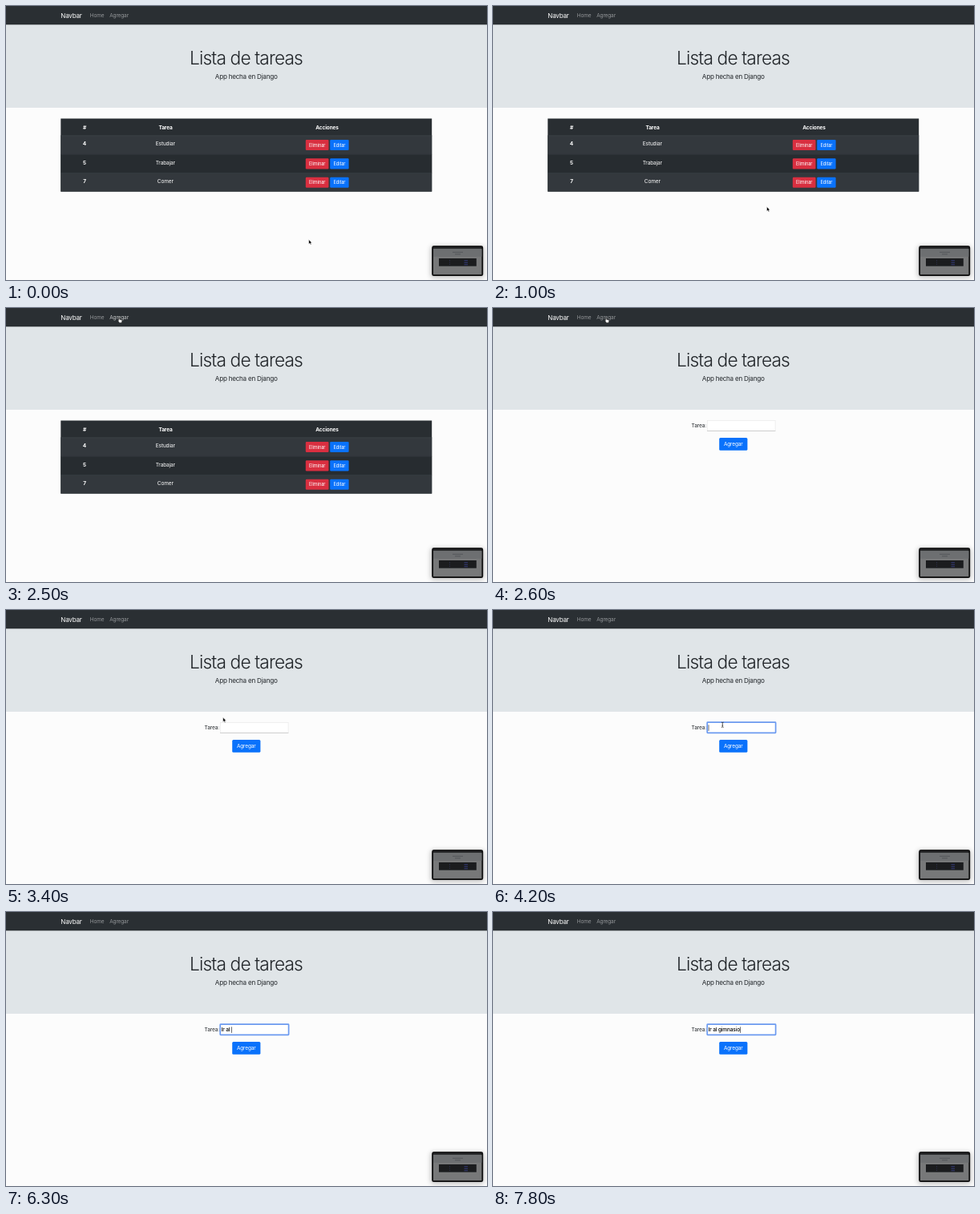
Recreate the animation shown at these times as an HTML page. Size 600 by 342 pixels, loop 8000 ms.

```html
<!DOCTYPE html>
<html lang="es">
<head>
<meta charset="utf-8">
<title>Lista de tareas</title>
<style>
  html, body { margin: 0; width: 100%; height: 100%; overflow: hidden; background: #fcfcfc; }
  svg { display: block; width: 100vw; height: 100vh; }
  text { font: 6.5px Inter, "Noto Sans", sans-serif; font-optical-sizing: none; letter-spacing: -.02em; white-space: pre; fill: #212529; }
  .mid { text-anchor: middle; }
  .head { font-weight: 700; }
  .light { fill: #fff; }
  .brand { font-size: 8.1px; letter-spacing: -.03em; }
  .title { font-size: 22.75px; font-weight: 300; letter-spacing: -.038em; }
  .lead { font-size: 8.12px; letter-spacing: -.03em; }
  .small { font-size: 5.7px; }
  .link { fill: #94979a; }
  .link.hover { fill: #c9cbcc; }
  #typed { font-weight: 500; fill: #000; }
</style>
</head>
<body>
<svg viewBox="0 0 600 342">
  <defs>
    <filter id="blur" x="-30%" y="-30%" width="160%" height="160%"><feGaussianBlur stdDeviation="3"/></filter>
  </defs>
  <rect width="600" height="342" fill="#fcfcfc"/>
  <rect y="23" width="600" height="104" fill="#e0e5e8"/>
  <rect width="600" height="23.3" fill="#2a2f33"/>
  <text class="light brand" x="68.3" y="14.6">Navbar</text>
  <text class="link" x="104.8" y="14.3">Home</text>
  <text class="link" id="add" x="129.2" y="14.3">Agregar</text>
  <text class="title mid" x="299.5" y="72.9">Lista de tareas</text>
  <text class="lead mid" x="299.7" y="90.5">App hecha en Django</text>

  <g id="list">
    <rect x="68.3" y="140.5" width="462.9" height="91" fill="#292e32"/>
    <text class="light head mid" x="98" y="153.7">#</text>
    <text class="light head mid" x="199" y="153.7">Tarea</text>
    <text class="light head mid" x="400.5" y="153.7">Acciones</text>
  </g>

  <g id="form">
    <text x="247.6" y="149.3" fill="#212529">Tarea:</text>
    <rect x="267.3" y="140.3" width="84.8" height="13.2" fill="#fff" stroke="#e6e6e6" stroke-width=".6"/>
    <path d="M267 153.4H352.4" stroke="#b8b8b8" stroke-width=".6"/>
    <rect id="ring" x="267.2" y="140.2" width="85.4" height="13.2" rx=".6" fill="#fff" stroke="#6c9af0" stroke-width="1.7"/>
    <text id="typed" x="268.6" y="149.3"></text>
    <rect id="caret" y="143.3" width=".6" height="7.6" fill="#111"/>
    <rect x="282.2" y="162" width="35.2" height="15.8" rx="1.6" fill="#0a72fb"/>
    <text class="light mid" x="299.8" y="172.3">Agregar</text>
  </g>

  <g id="thumb">
    <rect x="530" y="300" width="66" height="39" rx="3" opacity=".25" filter="url(#blur)"/>
    <rect x="531.2" y="299.3" width="64" height="37.8" rx="2.4" fill="#0c0c0d"/>
    <rect x="533" y="301" width="60.4" height="2.2" fill="#27282a"/>
    <rect x="533" y="303.2" width="60.4" height="32" fill="#777879"/>
    <rect x="533" y="303.2" width="60.4" height="9.6" fill="#6d6f71"/>
    <path d="M557 307.3H570M560 309.8H567" stroke="#4a4c4f" stroke-width=".7"/>
    <rect x="540" y="315" width="46.8" height="9.7" fill="#1b1c1e"/>
    <path d="M553.5 317V323.5" stroke="#33355a" stroke-width=".8" stroke-dasharray="1 1.4"/>
    <path d="M571.5 317.8H576M571.5 320.3H576M571.5 322.8H576" stroke="#343a78" stroke-width="1"/>
  </g>

  <path id="arrow" d="M0 0V5.6L1.3 4.5L2.2 6.5L3.2 6.1L2.3 4.1H4Z" stroke="#fff" stroke-width=".5"/>
  <path id="hand" d="M0 .4Q.6-.5 1.2 .4V2.2L4 2.9Q4.6 3.2 4.3 4.8L3.7 6.4H1L-.9 3.6Q-.8 2.9 0 3.5Z" fill="#fff" stroke="#111" stroke-width=".5"/>
  <path id="beam" d="M-1.4-3Q0-3 0-2.2Q0-3 1.4-3M0-2.2V2.4M-1.4 3.2Q0 3.2 0 2.4Q0 3.2 1.4 3.2M-.8.9H.8" fill="none" stroke="#222" stroke-width=".7"/>
</svg>
<script>
const LOOP = 8000, STEP = 100;
const PHRASE = 'Ir al gimnasio';
const KEY_TIMES = [5500, 5800, 5900, 6000, 6100, 6300, 6800, 6900, 7000, 7300, 7400, 7600, 7700, 7800];
const NAVIGATE = 2600, FOCUS = 4200;
// Pointer path: time, x, y
const PATH = [
  [0, 377.7, 291.6], [400, 377.7, 291.6], [1000, 341.5, 250.6], [1300, 342, 168],
  [2200, 144, 17], [2300, 140.4, 12], [2800, 140.4, 12],
  [3100, 255, 125], [3200, 255, 125], [3600, 286.3, 143.2], [LOOP, 286.3, 143.2]
];
const $ = id => document.getElementById(id);
const show = (id, on) => $(id).style.display = on ? '' : 'none';

function add(parent, tag, attrs, text = '') {
  const el = document.createElementNS('http://www.w3.org/2000/svg', tag);
  for (const k in attrs) el.setAttribute(k, attrs[k]);
  el.textContent = text;
  parent.append(el);
}

function button(x, y, width, fill, label) {
  add($('list'), 'rect', { x, y, width, height: 13.1, rx: 1.2, fill });
  add($('list'), 'text', { class: 'light small mid', x: x + width / 2, y: y + 8.7 }, label);
}

[['4', 'Estudiar'], ['5', 'Trabajar'], ['7', 'Comer']].forEach(([id, task], i) => {
  const y = 161.5 + i * 23.4;
  add($('list'), 'rect', { x: 68.3, y, width: 462.9, height: 23.4, fill: i % 2 ? '#272c30' : '#33383d' });
  add($('list'), 'rect', { x: 68.3, y, width: 462.9, height: i ? .4 : .8, fill: '#3c4247' });
  add($('list'), 'text', { class: 'light head mid', x: 98, y: y + 12.9 }, id);
  add($('list'), 'text', { class: 'light mid', x: 198.8, y: y + 12.9 }, task);
  button(373.8, y + 5.4, 28.7, '#d92f40', 'Eliminar');
  button(404.2, y + 5.4, 23.4, '#0a72fb', 'Editar');
});

function pointer(t) {
  const i = PATH.findIndex(p => p[0] > t);
  const [t0, x0, y0] = PATH[i - 1], [t1, x1, y1] = PATH[i];
  const k = (t - t0) / (t1 - t0);
  return [x0 + (x1 - x0) * k, y0 + (y1 - y0) * k];
}

function caretAlpha(t) {
  if (t < 4700 || t >= 5200) return 1;
  return t < 4800 || t >= 5000 ? .5 : 0;
}

function draw(t) {
  const onForm = t >= NAVIGATE;
  show('list', !onForm);
  show('form', onForm);

  const [x, y] = pointer(t);
  const shape = x < 154 && y < 16 ? 'hand' : onForm && x > 267 && y > 139 ? 'beam' : 'arrow';
  for (const id of ['arrow', 'hand', 'beam']) show(id, id === shape && t < KEY_TIMES[0]);
  $(shape).setAttribute('transform', `translate(${x} ${y})`);
  $('add').classList.toggle('hover', shape === 'hand' && !onForm);

  const focused = t >= FOCUS;
  show('ring', focused);
  show('caret', focused);
  const count = KEY_TIMES.filter(k => k <= t).length;
  $('typed').textContent = PHRASE.slice(0, count);
  const width = count ? $('typed').getComputedTextLength() : 0;
  $('caret').setAttribute('x', 268.7 + width);
  $('caret').setAttribute('opacity', caretAlpha(t));
}

const start = performance.now();
function frame() {
  const t = (performance.now() - start) % LOOP;
  draw(Math.floor(t / STEP) * STEP);
  requestAnimationFrame(frame);
}
frame();
</script>
</body>
</html>
```
